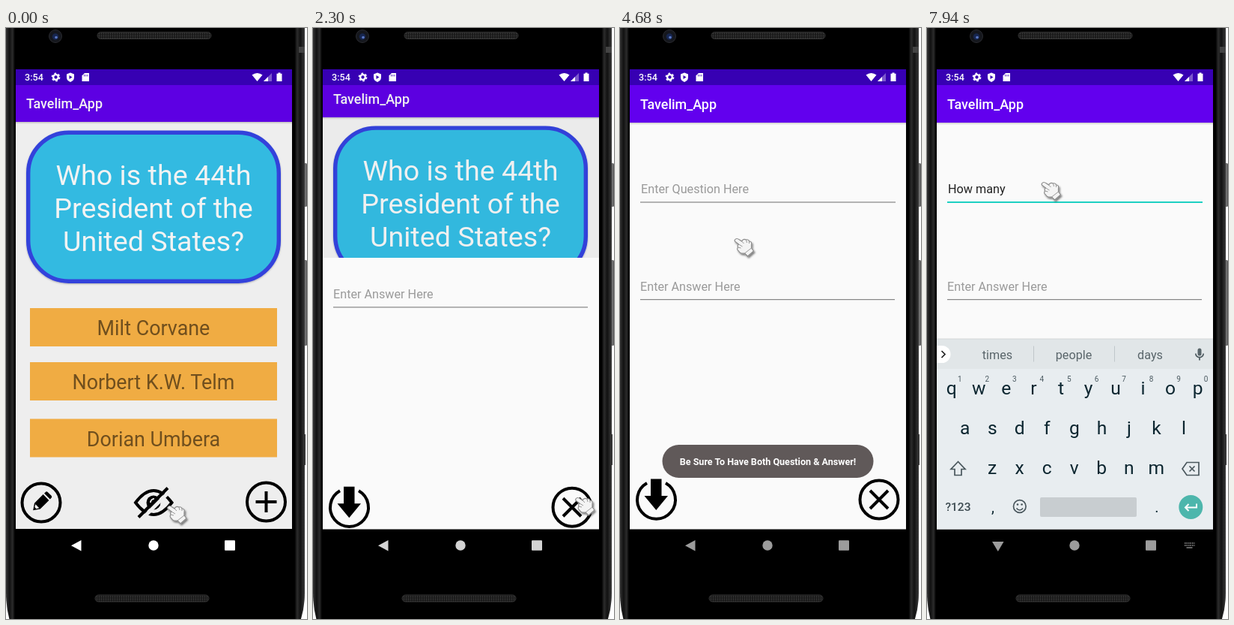
Animation, 402 px wide and 787 px high, one loop 8 s. Source, as an HTML page:

```html
<!DOCTYPE html>
<html lang="en">
<head>
<meta charset="utf-8">
<title>Flash card app</title>
<style>
  html, body { margin: 0; width: 100%; height: 100%; overflow: hidden; background: #fff; }
  svg { display: block; width: 402px; height: 787px; }
  text { font-family: Roboto, sans-serif; white-space: pre; }
  .mid { text-anchor: middle; }
  .title { font-size: 17.95px; font-weight: 500; fill: #fff; }
  .question { font-size: 37.7px; fill: #fff; }
  .option { font-size: 26.9px; fill: #75531f; }
  .field { font-size: 16.2px; fill: #212121; }
  .hint { fill: #9a9a9a; }
  .word { font-size: 16.2px; fill: #59656a; }
  .key { font-size: 24.6px; fill: #0c2630; }
  .digit { font-size: 10px; fill: #4b5a61; }
  .line { fill: none; stroke: #000; stroke-width: 4; }
  .thin { fill: none; stroke: #4a575d; stroke-width: 1.7; }
</style>
</head>
<body>
<svg viewBox="0 0 402 787">
  <defs>
    <clipPath id="screen"><rect x="13" y="55" width="369" height="612.6"/></clipPath>
    <clipPath id="reveal"><rect id="revealBox" x="13" y="55" width="369" height="613"/></clipPath>
    <linearGradient id="side">
      <stop offset="0" stop-color="#333"/><stop offset=".012" stop-color="#111"/>
      <stop offset=".022" stop-color="#2c2c2c"/><stop offset=".03" stop-color="#000"/>
      <stop offset=".966" stop-color="#000"/><stop offset=".975" stop-color="#2c2c2c"/>
      <stop offset=".985" stop-color="#111"/><stop offset="1" stop-color="#3a3a3a"/>
    </linearGradient>
    <linearGradient id="sideKey">
      <stop offset="0" stop-color="#222"/><stop offset=".5" stop-color="#777"/><stop offset="1" stop-color="#555"/>
    </linearGradient>
    <linearGradient id="barShadow" x2="0" y2="1">
      <stop offset="0" stop-opacity=".2"/><stop offset="1" stop-opacity="0"/>
    </linearGradient>
    <pattern id="mesh" width="3" height="3" patternUnits="userSpaceOnUse">
      <rect width="3" height="3" fill="#171717"/><circle cx="1.5" cy="1.5" r=".9" fill="#3d3d3d"/>
    </pattern>
    <filter id="soft" x="-10%" y="-10%" width="120%" height="125%">
      <feDropShadow dx="0" dy="1" stdDeviation="1.3" flood-opacity=".28"/>
    </filter>
    <filter id="handShadow" x="-30%" y="-30%" width="170%" height="170%">
      <feDropShadow dx="1.5" dy="2" stdDeviation="1" flood-opacity=".5"/>
    </filter>
    <g id="appBar">
      <rect x="13" y="55" width="369" height="613" fill="#fafafa"/>
      <rect x="13" y="126" width="369" height="3" fill="url(#barShadow)"/>
      <rect x="13" y="70" width="369" height="56" fill="#6200ee"/>
      <text class="title" x="27" y="108">Tavelim_App</text>
    </g>
  </defs>

  <!-- phone -->
  <g fill="url(#sideKey)">
    <rect x="397" y="180" width="5" height="58" rx="1.5"/>
    <rect x="397" y="309" width="5" height="114" rx="1.5"/>
  </g>
  <rect x="397" y="541" width="3" height="41" fill="#333"/>
  <path d="M0-10H399V752Q399 776 391 795H7Q0 776 0 752Z" fill="url(#side)"/>
  <rect x="391" y="25" width="8" height="8" fill="#444"/>
  <rect x="122" y="5.5" width="152" height="9" rx="4.5" fill="url(#mesh)" stroke="#333"/>
  <rect x="119" y="755" width="152" height="9" rx="4.5" fill="url(#mesh)" stroke="#333"/>
  <circle cx="66" cy="11" r="8.5" fill="#15171d" stroke="#2a2b30"/>
  <circle cx="66" cy="11.5" r="4.2" fill="#17264f"/>
  <circle cx="67" cy="12.5" r="1.8" fill="#5a78c4"/>
  <rect x="13" y="55" width="369" height="656" fill="#000"/>

  <g clip-path="url(#screen)">
    <g id="card">
      <use href="#appBar"/>
      <rect x="29.7" y="140.2" width="334.6" height="198" rx="54" fill="#35c3ec" stroke="#3644e6" stroke-width="5.4" filter="url(#soft)"/>
      <g class="question mid">
        <text x="197" y="210">Who is the 44th</text>
        <text x="197" y="254">President of the</text>
        <text x="197" y="298">United States?</text>
      </g>
      <path d="M32 374h330v51H32zM32 446h330v51H32zM32 521.5h330v51H32z" fill="#fcb446"/>
      <g class="option mid">
        <text x="197" y="410">Milt Corvane</text>
        <text x="197" y="482">Norbert K.W. Telm</text>
        <text x="197" y="557.5">Dorian Umbera</text>
      </g>
      <circle class="line" cx="47" cy="633" r="25.5"/>
      <g transform="translate(47.5 632) rotate(45)">
        <path d="M-5.5-8.5H5.5V8L0 16L-5.500 8ZM-5.500-10.500V-13Q-5.500-15-3.500-15H3.500Q5.500-15 5.500-13V-10.500Z"/>
        <path d="M-3.500 8H3.500L1.500 11.500H-1.500Z" fill="#fafafa"/>
      </g>
      <path class="line" d="M173 633Q197 601 221.500 633Q197 665 173 633Z"/>
      <circle cx="197" cy="633" r="9.500"/>
      <path d="M193 633a5 5 0 0 1 5-5" fill="none" stroke="#fafafa" stroke-width="2"/>
      <path d="M181 655.500L219.500 617" stroke="#fafafa" stroke-width="5"/>
      <path class="line" d="M177 652.500L216 613.500"/>
      <circle class="line" cx="347.500" cy="632" r="25.500"/>
      <path class="line" d="M333.500 632h28M347.500 618v28"/>
    </g>
    <rect id="dim" x="13" y="55" width="369" height="613"/>

    <g id="form" clip-path="url(#reveal)">
      <use href="#appBar"/>
      <text class="field hint" id="hint" x="28" y="219.5">Enter Question Here</text>
      <text class="field" id="typed" x="28" y="219.5" xml:space="preserve"></text>
      <rect id="underline" x="27" width="341"/>
      <rect id="caret" y="202.500" width="2" height="21.500" fill="#1ecbbd"/>
      <text class="field hint" x="27" y="349.500">Enter Answer Here</text>
      <rect x="27" y="361" width="340" height="1.200" fill="#858585"/>
      <path class="line" d="M36 606a25.500 25.500 0 1 0 25 0"/>
      <path d="M41 600.500H55.500V623H64L48.300 642L32.500 623H41Z"/>
      <circle class="line" cx="346" cy="628" r="25.500"/>
      <path class="line" d="M334 616l24 24M358 616l-24 24"/>
    </g>

    <g id="keyboard">
      <rect x="13" y="414" width="369" height="254" fill="#e8edf0"/>
      <rect x="13" y="414" width="369" height="40" fill="#e1e6e8"/>
      <rect x="13" y="413" width="369" height="1.500" fill="#000" opacity=".07"/>
      <path d="M13 423h7a11.500 11.500 0 0 1 0 23h-7Z" fill="#fff"/>
      <path class="thin" d="M19.500 430l4.500 4.500l-4.500 4.500" style="stroke:#222"/>
      <path d="M142.500 423.500v21M250.500 423.500v21" stroke="#c0c7ca"/>
      <g id="words" class="word mid"><text x="94" y="440.500"/><text x="196" y="440.500"/><text x="298" y="440.500"/></g>
      <rect x="361.500" y="426.500" width="5" height="10" rx="2.500" fill="#59656a"/>
      <path class="thin" d="M358.800 433.500a5.200 5.200 0 0 0 10.400 0M364 439v3.500"/>
      <g id="keys"></g>
      <path class="thin" d="M41.500 577.500L32 587.500H37V595.500H46V587.500H51Z"/>
      <path class="thin" d="M341 587L347 578.500H363V595.500H347ZM350.500 583.500l7 7M357.500 583.500l-7 7"/>
      <text class="mid" x="41.500" y="643" font-size="15.500" font-weight="500" fill="#3c4a50">?123</text>
      <text class="key mid" x="88" y="645" style="font-size:20px">,</text>
      <text class="key mid" x="307" y="645" style="font-size:20px">.</text>
      <circle class="thin" cx="123.800" cy="637" r="8.300"/>
      <path class="thin" d="M119.500 639.500q4.300 5 8.600 0"/>
      <circle cx="121" cy="634.500" r="1.300" fill="#4a575d"/><circle cx="126.600" cy="634.500" r="1.300" fill="#4a575d"/>
      <rect x="151" y="625" width="129" height="26" rx="2" fill="#c8cdd0"/>
      <circle cx="352.300" cy="638" r="16" fill="#4db6ac"/>
      <path d="M360 633.500V638.500H345M349.500 634l-4.500 4.500l4.500 4.500" fill="none" stroke="#fff" stroke-width="2"/>
    </g>

    <g id="toast">
      <rect x="56.500" y="555" width="282" height="44" rx="22" fill="#605959"/>
      <text class="mid" x="197.500" y="581.700" font-size="12.570" font-weight="700" fill="#fff">Be Sure To Have Both Question &amp; Answer!</text>
    </g>
  </g>

  <!-- status bar -->
  <rect x="13" y="55" width="369" height="21" fill="#3700b3"/>
  <g fill="#fff">
    <text x="25" y="70" font-size="12.600" font-weight="500">3:54</text>
    <circle cx="66.500" cy="65.500" r="3.300" fill="none" stroke="#fff" stroke-width="2.300"/>
    <circle cx="66.500" cy="65.500" r="5" fill="none" stroke="#fff" stroke-width="1.800" stroke-dasharray="2.600 2.636"/>
    <path d="M86 59.500L91 61.500V65.500Q91 70 86 72Q81 70 81 65.500V61.500Z"/>
    <path d="M84.500 63v5l4-2.500Z" fill="#3700b3"/>
    <path d="M105 60h6v11h-9.500v-7.500Z"/>
    <path d="M104.500 62v2.500M106.700 62v2.500M108.900 62v2.500" stroke="#3700b3" stroke-width=".8"/>
    <path d="M328.500 62.500Q335.500 57.500 342.500 62.500L335.500 71Z"/>
    <path d="M355 60v11h-11Z" opacity=".35"/><path d="M350 65v6h-6Z"/>
    <path d="M363.500 59.500h3v1.200h2v10.300h-7v-10.300h2Z"/>
  </g>

  <!-- navigation bar -->
  <g id="nav">
    <path id="back" d="M100.500 682V696.500L87 689.200Z"/>
    <path id="down" d="M87 684H102.500L94.800 697Z"/>
    <circle cx="197" cy="689" r="6.700"/>
    <rect x="292" y="682.300" width="14" height="13.500" rx="1"/>
    <g id="imeIcon" fill="none" stroke="#999" stroke-width="1.300">
      <path d="M344 686h13.500M344 689h13.500" stroke-dasharray="1.500 1"/>
      <path d="M346.500 692h8"/>
    </g>
  </g>

  <!-- pointing hand, centred on its own origin -->
  <g id="hand" filter="url(#handShadow)">
    <path d="M-12-10Q-10-13-6-10L-3-8Q-1-12 3-10Q6-11 7-8Q11-8 10-3L10 1L13 5L5 12L1 8Q-5 9-7 5Q-10 3-8 0Q-9-3-7-4L-11-7Q-13-8-12-10Z" fill="#f4f4f4" stroke="#8b8b8b" stroke-width="1.200" stroke-linejoin="round"/>
    <path d="M-3-8L0-5M3-10L4-6M7-8V-5M-7-4L-2-1M-8 0L-4 1M1 8L10 1" fill="none" stroke="#999" stroke-width="1"/>
  </g>
</svg>
<script>
const LOOP = 8000;
const $ = id => document.getElementById(id);
const clamp = v => Math.min(1, Math.max(0, v));
const span = (t, from, to) => clamp((t - from) / (to - from));
const show = (id, on) => $(id).setAttribute('opacity', +on);
const shift = (id, x, y) => $(id).setAttribute('transform', `translate(${x} ${y})`);

const ticks = [0, 120, 270, 400, 540, 2030, 2180, 2300, 2450, 2570, 2700, 2830, 2960,
  3080, 3200, 3350, 3500, 3620, 3770, 4050, 4180, 4300, 4430, 4560, 4680, 4830, 4980,
  5100, 5250, 5380, 5530, 5800, 6140, 6270, 6400, 6540, 6670, 6810, 6950, 7080, 7230, 7380, 7940];

// time, x, y of the pointer
const path = [[0, 228, 648], [120, 240, 647], [540, 363, 637], [2570, 363, 637], [2830, 180, 335],
  [2960, 113, 253], [3080, 117, 235], [3200, 112, 270], [3620, 66, 590], [3770, 62, 626],
  [4300, 62, 626], [4680, 165.5, 292], [4980, 165.5, 226], [5100, 165.5, 217]];

// time, typed text, suggestions
const typing = [[0, '', 'the I thanks'], [6270, 'H', 'have How he'], [6400, 'Ho', 'Ho How Home'],
  [6540, 'How', 'Hows How However'], [6670, 'How ', 'much are to'], [6950, 'How m', 'my much many'],
  [7080, 'How ma', 'may many make'], [7230, 'How many', 'Many many money'],
  [7380, 'How many ', 'times people days']];

function pointer(t) {
  const i = path.findLastIndex(p => p[0] <= t);
  const a = path[i], b = path[i + 1] || a;
  const p = a === b ? 0 : span(t, a[0], b[0]);
  return [a[1] + (b[1] - a[1]) * p, a[2] + (b[2] - a[2]) * p];
}

function buildKeys() {
  const text = (cls, x, y, label) => `<text class="${cls} mid" x="${x}" y="${y}">${label}</text>`;
  const rows = [['qwertyuiop', 32.7, 488], ['asdfghjkl', 50.7, 540.5], ['zxcvbnm', 87, 593.5]];
  $('keys').innerHTML = rows.map(([letters, x, y], row) => [...letters].map((c, i) => {
    const cx = x + i * 36.55;
    return text('key', cx, y, c) + (row ? '' : text('digit', cx + 11, 470.5, (i + 1) % 10));
  }).join('')).join('');
}

function render(now) {
  const t = ticks.findLast(tick => tick <= now);

  const settle = 1 - span(t, 0, 540);
  const open = 1 - (1 - span(t, 2200, 2700)) ** 4;
  shift('card', 0, -Math.ceil(settle) - 12 * open);
  show('dim', .048 * settle + .1 * open);
  shift('form', 0, 25 * (1 - open));
  show('form', open > 0);
  $('revealBox').setAttribute('y', 55 + 588 * (1 - open));

  const grey = Math.round(255 - 99 * (.26 * span(t, 2030, 2180) + .74 * span(t, 2180, 2700)));
  $('nav').setAttribute('fill', `rgb(${grey},${grey},${grey})`);

  show('toast', span(t, 3950, 4300) * (1 - span(t, 6050, 6400)));

  const focus = t >= 5250;
  const slide = span(t, 5100, 5530);
  shift('keyboard', 0, 100 * (1 - slide) ** 2);
  show('keyboard', t < 6140 ? .96 * slide : 1);
  show('back', !focus);
  show('down', focus);
  show('imeIcon', focus);

  const [, typed, words] = typing.findLast(entry => entry[0] <= t);
  $('typed').textContent = typed;
  show('hint', !typed);
  words.split(' ').forEach((word, i) => { $('words').children[i].textContent = word; });

  const line = $('underline');
  line.setAttribute('y', focus ? 231 : 231.4);
  line.setAttribute('height', focus ? 2 : 1.2);
  line.setAttribute('fill', focus ? '#1ed0c2' : '#858585');
  const blinkOff = (t >= 5800 && t < 6140) || t >= 7940;
  $('caret').setAttribute('x', 27.5 + (typed ? $('typed').getComputedTextLength() : 0));
  show('caret', focus && !blinkOff);

  shift('hand', ...pointer(t));
}

buildKeys();
const start = performance.now();
function loop() {
  render((performance.now() - start) % LOOP);
  requestAnimationFrame(loop);
}
loop();
</script>
</body>
</html>
```
